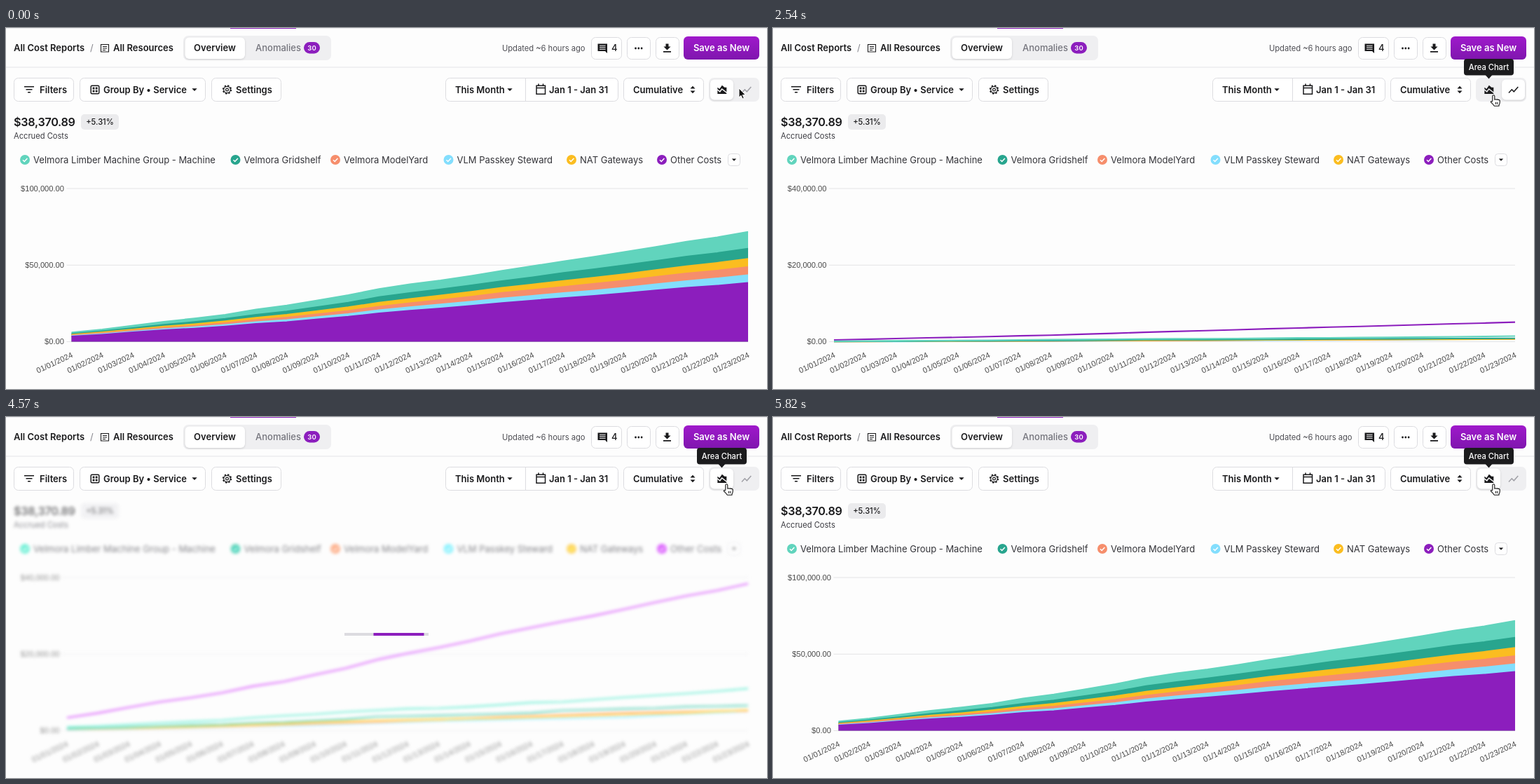
An HTML page that plays this animation: 1086 by 515 pixels, repeating every 5850 ms.

```html
<!DOCTYPE html>
<html lang="en">
<head>
<meta charset="utf-8">
<title>Cost report</title>
<style>
html, body { margin: 0; width: 100%; height: 100%; overflow: hidden; background: #fdfdfd; }
svg { display: block; width: 1086px; height: 515px; font: 13px Inter, sans-serif; fill: #1a1a1c; }
.b { font-weight: 600; }
.m { font-weight: 500; }
.s { font-size: 11.15px; }
.axis { font: 11.15px "Liberation Sans", Arial, sans-serif; fill: #4a4a4a; }
.end { text-anchor: end; }
.mid { text-anchor: middle; }
.btn { fill: #fff; stroke: #dcdce0; }
.ico { fill: none; stroke: #1a1a1c; stroke-width: 1.5; }
.lift { filter: drop-shadow(0 1px 1.5px #0002); }
</style>
</head>
<body>
<svg viewBox="0 0 1086 515">
  <defs>
    <linearGradient id="save" x2="0" y2="1"><stop stop-color="#9f19cb"/><stop offset="1" stop-color="#7f16ae"/></linearGradient>
    <clipPath id="track"><rect x="483" y="308.5" width="120" height="3.5"/></clipPath>
  </defs>
  <g id="page"></g>
  <g id="toggle"></g>
  <g id="data"><g id="head"></g><g id="chart"></g></g>
  <g id="loader" clip-path="url(#track)">
    <rect x="483" y="308" width="120" height="4" fill="#dcdbe0"/>
    <rect id="bar" y="308" width="72" height="4" fill="#8c1ebd"/>
  </g>
  <g id="tip"></g>
  <path id="arrow" fill="#111" stroke="#fff" d="M0 0V13L3 10.3 5 15 7.2 14 5.2 9.5H9.3Z"/>
  <path id="hand" fill="#fff" stroke="#111" stroke-width="1.1" stroke-linejoin="round"
    d="M-1.5 8V1a1.5 1.5 0 0 1 3 0V6q1.3-1 2.6 0 1.3-.8 2.5.3 1.7-.6 2.3 1V10q0 2-1.2 3.6V15H1Q-.5 12.6-4 9.4q.2-2 2.5-.4M3.2 9.5v3M5.5 9.5v3"/>
</svg>
<script>
const $ = id => document.getElementById(id);
const text = (x, y, s, cls = '', more = '') => `<text x="${x}" y="${y}" class="${cls}" ${more}>${s}</text>`;
const box = (x, y, x2, y2, r, more = 'class="btn"') =>
  `<rect x="${x}" y="${y}" width="${x2 - x}" height="${y2 - y}" rx="${r}" ${more}/>`;
const icon = (d, more = '') => `<path class="ico" d="${d}" ${more}/>`;
const caret = (x, y) => `<path d="M${x - 3.7} ${y - 1.8}h7.4l-3.7 3.9z"/>`;
const row = (x, x2) => box(x + .5, 71.5, x2 - .5, 104.5, 6);
const ring = (r, more) => `<circle class="ico" cx="315.5" cy="88" r="${r}" ${more}/>`;

// Values in thousands, evenly spread over the month
const N = 23;
const series = [
  ['#8c1ebd', [3.4, 4.6, 6.1, 7.5, 8.6, 9.9, 11.6, 12.8, 14.6, 16.3, 18.5, 20.2, 21.7, 23.4, 25.3, 26.9, 28.5, 30, 31.7, 33.5, 35.2, 36.6, 38.4]],
  ['#83defd', [.35, .55, .85, 1.2, 1.5, 2.05, 2.6, 2.95, 3.25, 3.6, 4.4, 5.1]],
  ['#f68e6c', [.4, .65, .95, 1.35, 1.85, 2.3, 2.9, 3.6, 4.1, 4.65, 5, 5.2]],
  ['#fbbd20', [.45, .7, 1.05, 1.5, 2.1, 2.6, 2.95, 3.35, 3.8, 4.25, 4.7, 5.4]],
  ['#28a58e', [.5, .65, .9, 1.15, 1.4, 1.6, 2, 2.2, 2.6, 3, 3.7, 3.85, 4, 4.2, 4.4, 4.65, 5.3, 5.5, 5.75, 5.9, 6.3, 6.4, 6.6]],
  ['#61d4bd', [.95, 1.2, 1.6, 2, 2.35, 2.7, 3.4, 3.9, 4.3, 4.9, 5.3, 5.75, 5.85, 6.25, 6.75, 7.35, 7.5, 8.1, 8.7, 9.2, 9.7, 10.3, 11]],
].map(([color, pts]) => [color, Array.from({ length: N }, (_, i) => {
  const u = i / (N - 1) * (pts.length - 1), k = Math.min(Math.floor(u), pts.length - 2);
  return pts[k] + (pts[k + 1] - pts[k]) * (u - k);
})]);

function drawPage() {
  $('page').innerHTML =
    box(0, 0, 1086, 1, 0, 'fill="#ececef"') + box(320, 0, 414, 1, 0, 'fill="#8c1ebd"') +
    box(0, 55.5, 1086, 56.5, 0, 'fill="#e4e4e7"') +
    text(11, 33, 'All Cost Reports', 'b') + text(120, 33, '/', '', 'fill="#85858c"') +
    icon('M135.5 23.5h11v10.5h-11zM138 26.5h6M138 29h6M138 31.5h4', 'style="stroke-width:1.1"') +
    text(153, 33, 'All Resources', 'b') +
    box(253, 11, 464, 46, 7, 'fill="#efeff1"') + box(255.5, 13.5, 341, 44, 6, 'fill="#fff" class="lift"') +
    text(298, 33, 'Overview', 'b mid') + text(356, 33, 'Anomalies', 'm', 'fill="#75757d"') +
    box(425, 20, 448, 36.5, 8.2, 'fill="#8c1ebd"') +
    text(436.5, 31.8, '30', 'b mid', 'fill="#fff" font-size="9.5"') +
    text(708, 32.5, 'Updated ~6 hours ago', 's', 'fill="#4c4c52"') +
    box(835.5, 13.5, 878.5, 44.5, 6) + box(886.5, 13.5, 919.5, 44.5, 6) + box(927.5, 13.5, 960.5, 44.5, 6) +
    '<path d="M844.5 22.5h13.5v13.5l-3-3h-10.5z"/>' +
    icon('M847 25.3h8.5M847 27.8h8.5M847 30.3h8.5', 'style="stroke:#fff;stroke-width:1.1"') +
    text(864, 33, '4', 'm') +
    [898.5, 902.8, 907.1].map(x => `<circle cx="${x}" cy="29" r="1.4"/>`).join('') +
    '<path d="M941.5 22.5h4v4h3l-5 5-5-5h3zM938 33h11v1.7h-11z"/>' +
    box(967, 12, 1075, 45, 6, 'fill="url(#save)"') + text(1021, 33, 'Save as New', 'b mid', 'fill="#fff"') +
    row(11, 97) + icon('M26 83.7h14M28.5 87.7h9M31 91.7h4') + text(48, 92.5, 'Filters', 'b') +
    row(105, 285) + box(121.2, 82.2, 132.8, 93.8, 1.5, 'class="ico"') +
    icon('M123.6 86h2.8M127.8 86h2.8M123.6 90.2h2.8M127.8 90.2h2.8', 'style="stroke-width:2.8"') +
    text(139, 92.5, 'Group By • Service', 'b') + caret(269, 88) +
    row(293, 393) + ring(5.8, 'stroke-dasharray="2.28" style="stroke-width:1.8"') +
    ring(4.7, 'style="stroke-width:1.2"') + ring(1.9, 'style="stroke-width:1.2"') +
    text(328, 92.5, 'Settings', 'b') +
    row(627, 874) + box(741, 72, 742, 104, 0, 'fill="#dcdce0"') +
    text(641, 92.5, 'This Month', 'b') + caret(719, 88) +
    icon('M757 82.2h12.5v12H757zM757 85.5h12.5M760 79.5v3M766.5 79.5v3') + text(775, 92.5, 'Jan 1 - Jan 31', 'b') +
    row(881, 996) + text(895, 92.5, 'Cumulative', 'b') +
    '<path d="M976.5 86.6h7l-3.5-3.8zM976.5 89.4h7l-3.5 3.8z"/>';

  const legend = [
    [27, 5, 'Velmora Limber Machine Group - Machine'], [327.5, 4, 'Velmora Gridshelf'],
    [470, 2, 'Velmora ModelYard'], [631.5, 1, 'VLM Passkey Steward'],
    [807, 3, 'NAT Gateways'], [936, 0, 'Other Costs']];
  $('head').innerHTML =
    text(11, 140, '$38,370.89', 'b', 'font-size="16.2" letter-spacing="-.3"') +
    box(107, 123, 161, 145, 5, 'fill="#ebebed"') + text(134, 138, '+5.31%', 's m mid') +
    text(11, 158.3, 'Accrued Costs', 's', 'fill="#3c3c42"') +
    legend.map(([x, i, name]) => `<circle cx="${x}" cy="188" r="7" fill="${series[i][0]}"/>` +
      icon(`M${x - 3} 188.3l2.2 2.2 4.2-4.6`, 'style="stroke:#fff"') +
      text(x + 12, 192.6, name, '', 'fill="#333338"')).join('') +
    box(1030.5, 179.5, 1047.5, 196.5, 4) + `<g transform="translate(1039 188)scale(.85)">${caret(0, 0)}</g>`;
}

function drawChart(isLine, grow) {
  const left = isLine ? 87 : 93.5, base = 447.5, step = (1059 - left) / (N - 1);
  const max = isLine ? 40 : 100;
  const px = i => (left + i * step).toFixed(2), py = v => (base - v * grow * 218.5 / max).toFixed(2);
  let out = '';
  for (let k = 0; k < 3; k++) {
    const y = base - k * 109.25, v = (max * 500 * k).toLocaleString('en-US');
    out += box(left - 7, y - .5, 1059, y + .5, 0, 'fill="#e3e3e5"') + text(left - 10.5, y + 3.7, `$${v}.00`, 'axis end');
  }
  const sum = Array(N).fill(0), shapes = [];
  for (const [color, vals] of series) {
    const pts = vals.map((v, i) => `${px(i)} ${py(isLine ? v : sum[i] += v)}`).join('L');
    const fill = isLine ? '' : `<path d="M${left} ${base}L${pts}V${base}Z" fill="${color}"/>`;
    shapes.unshift(fill + `<path d="M${pts}" fill="none" stroke="${color}" stroke-width="2.1" stroke-linejoin="round"/>`);
  }
  out += (isLine ? shapes.reverse() : shapes).join('');
  for (let i = 0; i < N; i++) {
    const day = String(i + 1).padStart(2, '0');
    out += text(0, 4, `01/${day}/2024`, 'axis end', `transform="translate(${+px(i) + .9} 465.5)rotate(-25)"`);
  }
  $('chart').innerHTML = out;
}

function drawToggle(isLine) {
  const x = isLine ? 1040 : 1005;
  $('toggle').innerHTML = box(1003, 71, 1075, 105, 7, 'fill="#efeff1"') +
    box(x, 73.5, x + 33, 102.5, 6, 'fill="#fff" class="lift"') +
    '<path transform="translate(1013.2 79.7)scale(.72)" d="M3 13v7h18v-1.5l-9-7L8 17zM3 7l4 3 5-7 5 4h4v9l-9.4-7.3-4 5.4L3 10.4z"/>' +
    icon('M1050 92.5l4.3-4.7 3 3 6-6.8', `style="stroke:${isLine ? '#1a1a1c' : '#a0a0a6'}"`);
}

function drawTip(name, x, cx) {
  $('tip').innerHTML = name && box(x, 44, x + 71, 67.5, 4, 'fill="#1b1b1d"') +
    `<path d="M${cx - 5} 67h10l-5 5.5z" fill="#1b1b1d"/>` + text(x + 35.5, 59.5, name, 's m mid', 'fill="#fff"');
}

const LOOP = 5850, LINE_CLICK = 1550, LINE_READY = 2506, AREA_CLICK = 3980, AREA_READY = 4835;
const seg = (t, a, b) => Math.min(1, Math.max(0, (t - a) / (b - a)));
const smooth = u => u * u * (3 - 2 * u);
const outQuart = u => 1 - (1 - u) ** 4;
const last = {};
// Redraws a part only when its arguments change
function update(draw, ...args) {
  const key = args.join();
  if (last[draw.name] !== key) { last[draw.name] = key; draw(...args); }
}

function frame(now) {
  const t = now % LOOP;
  const isLine = t >= LINE_READY && t < AREA_READY;
  const start = isLine ? LINE_READY : AREA_READY;
  update(drawChart, isLine, t < LINE_READY ? 1 : outQuart(seg(t, start, start + 1000)));
  update(drawToggle, t >= LINE_CLICK && t < AREA_CLICK);

  const first = t >= LINE_CLICK && t < LINE_READY;
  const busy = first || t >= AREA_CLICK && t < AREA_READY;
  $('data').style.filter = busy ? 'blur(2px) saturate(1.8) opacity(.6)' : 'none';
  $('loader').style.display = busy ? '' : 'none';
  $('bar').setAttribute('x', 411 + 192 * ((t - (first ? LINE_CLICK : AREA_CLICK)) / 1000 % 1));

  if (t >= 1940) update(drawTip, 'Area Chart', 986, 1021.5);
  else if (t >= 1350 && t < 1850) update(drawTip, 'Line Chart', 1014, 1057);
  else update(drawTip, '', 0, 0);

  const isHand = t >= 620, go = smooth(seg(t, 1830, 1980)), settle = smooth(seg(t, 2050, 2400));
  $('arrow').style.display = isHand ? 'none' : '';
  $('hand').style.display = isHand ? '' : 'none';
  const near = seg(t, 200, 600);
  $('arrow').setAttribute('transform', `translate(${1046 + near} ${86 + 2 * near})`);
  $('hand').setAttribute('transform', `translate(${1047.5 - 16.7 * go - 2.5 * settle} ${89 + 8.2 * go - settle})`);
  requestAnimationFrame(frame);
}

drawPage();
requestAnimationFrame(frame);
</script>
</body>
</html>
```
